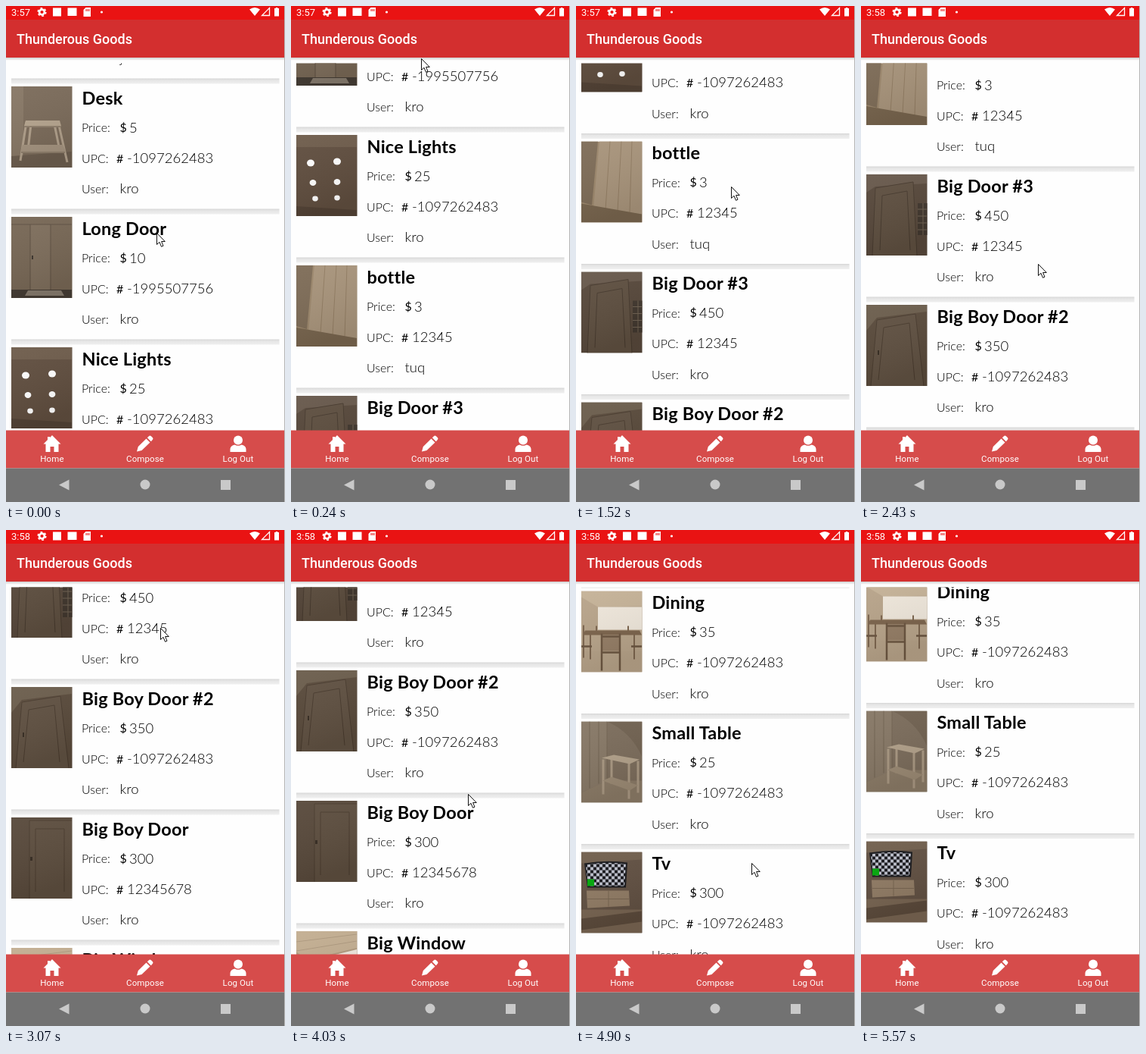
Recreate the animation shown at these times as an HTML page. Size 369 by 654 pixels, loop 5990 ms.

```html
<!DOCTYPE html>
<html lang="en">
<head>
<meta charset="utf-8">
<title>Item list</title>
<style>
html, body { margin: 0; width: 100%; height: 100%; overflow: hidden; background: #fff; }
svg { display: block; width: 369px; height: 654px; }
text { font-family: Lato, sans-serif; white-space: pre; }
.name { font-size: 23.5px; font-weight: 700; letter-spacing: .2px; }
.label, .sign { font-size: 16px; font-weight: 300; }
.sign { font-weight: 400; }
.value { font-size: 18.5px; font-weight: 300; }
.bar text { font-family: Roboto, sans-serif; fill: #fff; }
.clock { font-size: 13px; }
.title { font-size: 18px; font-weight: 500; }
.tab { font-size: 11.5px; text-anchor: middle; letter-spacing: .1px; }
</style>
</head>
<body>
<svg viewBox="0 0 369 654">
  <defs>
    <linearGradient id="gap" x2="0" y2="1"><stop stop-color="#d6d6d6"/><stop offset=".35" stop-color="#e6e6e6"/><stop offset="1" stop-color="#efefef"/></linearGradient>
    <linearGradient id="drop" x2="0" y2="1"><stop stop-color="#cfcfcf"/><stop offset="1" stop-color="#fff"/></linearGradient>
    <linearGradient id="shade" x2=".3" y2="1"><stop stop-color="#fff" stop-opacity=".05"/><stop offset="1" stop-color="#000" stop-opacity=".08"/></linearGradient>
    <pattern id="check" width="8" height="8" patternUnits="userSpaceOnUse"><path fill="#15151a" d="M0 0H8V8H0Z"/><path fill="#b9bcc8" d="M0 0H4V4H0ZM4 4H8V8H4Z"/></pattern>
    <clipPath id="view"><path d="M0 75.5H369V560H0Z"/></clipPath>
    <clipPath id="frame"><path d="M0 0H80.5V107H0Z"/></clipPath>
  </defs>
  <rect width="369" height="654" fill="#fefefe"/>
  <g clip-path="url(#view)"><g id="list"></g></g>
  <rect y="68" width="368" height="4" fill="url(#drop)"/>

  <g class="bar">
    <rect width="368" height="18.5" fill="#e91313"/>
    <rect y="18" width="368" height="50" fill="#d32f2f"/>
    <text class="clock" x="7" y="13" id="clock">3:57</text>
    <circle cx="47.500" cy="8" r="3.400" fill="none" stroke="#fff" stroke-width="2.600"/>
    <circle cx="47.500" cy="8" r="5.300" fill="none" stroke="#fff" stroke-width="1.600" stroke-dasharray="2.780"/>
    <path fill="#fff" d="M62 2.500H73V13.500H62ZM81.500 2.500H93.500V13H81.500ZM105.500 2H112V14H102.500V5Z"/>
    <path stroke="#e91313" d="M106 4V7M108 4V7M110 4V7"/>
    <circle cx="126.500" cy="8" r="1.600" fill="#fff"/>
    <path fill="#fff" d="M322 4.500Q329 -.5 336 4.500L329 13ZM355 3H356.800V2H359.200V3H361V13.500H355Z"/>
    <path fill="none" stroke="#fff" stroke-width="1.300" d="M338.500 12.500H348.500V2.500Z"/>
    <text class="title" x="14" y="50">Thunderous Goods</text>

    <rect y="559.500" width="368" height="50" fill="#d64c4b"/>
    <g fill="#fff">
      <path d="M61 566L72.500 577.500H69.500V588H63.500V581H58.500V588H52.500V577.500H49.500L55 572V568H58V569Z"/>
      <path d="M173 587.500L174.800 581L185.500 570.500L190.500 575.500L179.500 586ZM186.800 569.200L189.200 567Q190.500 566 192 567.300L194 569.200Q195 570.500 194 571.800L191.800 574.200Z"/>
      <circle cx="307" cy="572.500" r="6"/>
      <path d="M296.500 588V584Q297 579.500 302.500 578.500Q307 581 311.500 578.500Q317 579.500 317.500 584V588Z"/>
    </g>
    <text class="tab" x="61" y="601">Home</text>
    <text class="tab" x="184" y="601">Compose</text>
    <text class="tab" x="307" y="601">Log Out</text>

    <rect y="609.500" width="368" height="44.500" fill="#727272"/>
    <path fill="#c9c9c9" d="M70 631.500L83.500 624.500V638.500ZM284 625H297V638H284Z"/>
    <circle cx="184" cy="631" r="6.500" fill="#c9c9c9"/>
  </g>
  <path stroke="#b5b5b5" d="M368.500 0V654"/>
  <path id="cursor" fill="#fff" stroke="#111" stroke-linejoin="round" d="M.5 .5V15.500L4 12.300L6.500 18.300L9 17.200L6.600 11.500H11.300Z"/>
</svg>
<script>
const PITCH = 172, FIRST = 106, LOOP = 5990, STEP = 120;
const $ = id => document.getElementById(id);

const fill = (c, d) => `<path fill="${c}" d="${d}"/>`;
const line = (c, w, d) => `<path fill="none" stroke="${c}" stroke-width="${w}" d="${d}"/>`;
const wall = c => fill(c, 'M0 0H81V107H0Z');

const photos = {
  desk: wall('#7a6a59') + fill('#867664', 'M0 0H16V107H0Z') + fill('#6c5d4e', 'M0 92L80 86V107H0Z') +
    line('#b09f8a', 3, 'M20 47L12 98M62 47L74 100M26 50L22 84M57 50L64 84') +
    fill('#b5a48e', 'M19 45H64L66 52H17Z') + fill('#a4937f', 'M15 77H68L72 86H12Z') +
    line('#8e7e6b', 2, 'M17 53H66M13 87H71'),
  hall: wall('#766654') + fill('#7d6d5b', 'M25 10H52V96H25Z') + line('#5c4e40', 1, 'M25 10V96M52 10V96M0 10H80') +
    fill('#443c34', 'M0 96H80V107H0Z') + fill('#857a6d', 'M22 97H66L70 104H18Z') + fill('#3b342d', 'M27 51H29V56H27Z'),
  lights: wall('#5f4d3e') + fill('#6d5b4a', 'M0 0H80V16H0Z') + fill('#524235', 'M0 94L80 99V107H0Z') +
    [[19, 37], [54, 35], [22, 63], [54, 62], [25, 84], [54, 83]]
      .map(([x, y], i) => `<ellipse cx="${x}" cy="${y}" rx="${5 - (i >> 1) * .6}" ry="${4.6 - (i >> 1) * .6}" fill="#fff"/>`).join(''),
  bottle: wall('#9b866b') + fill('#7d6b56', 'M0 0H22L14 84L0 80Z') + fill('#a7937a', 'M24 0H80V96L16 88Z') +
    line('#917c62', 1, 'M38 0L32 90M53 0L48 92M67 0L64 94') + fill('#77644d', 'M0 82L80 96V107H0Z'),
  bricks: wall('#56473a') + fill('#66574a', 'M0 0H80V12L12 16L0 24Z') + fill('#5d4e3f', 'M12 18L62 10L67 107H8Z') +
    line('#46392d', 1, 'M8 107L12 18L62 10L67 107M18 100L21 28L54 22L58 100') +
    fill('#40362d', 'M68 38H81V80H68Z') + line('#6e6051', 1, 'M68 46H80M68 55H80M68 64H80M68 73H80M75 38V80'),
  slant: wall('#58493a') + fill('#6a5c4b', 'M0 0H80V9L14 17L0 34Z') + fill('#5f5041', 'M14 20L65 12L76 107H6Z') +
    line('#483a2d', 1, 'M6 107L14 20L65 12L76 107M16 99L23 30L57 24L64 99') + fill('#352b21', 'M15 60H17V66H15Z'),
  door: wall('#57483a') + fill('#5c4d3e', 'M24 4H80V107H24Z') +
    line('#483a2d', 1, 'M24 107V4H80M32 98V15H70V98') + fill('#352b21', 'M25 52H28V57H25Z'),
  window: wall('#ae987c') + fill('#c2ad90', 'M0 0H80V22L14 38L0 27Z') + line('#ad987d', 1, 'M0 14L80 4M0 26L80 13') +
    fill('#eee7dc', 'M15 40L80 24V87L9 79Z') + fill('#dcd1c0', 'M11 70L80 77V87L9 79Z') +
    line('#7b6a55', 1.5, 'M9 79L80 88') + fill('#a58f74', 'M0 81L80 92V107H0Z'),
  dining: wall('#b7a389') + fill('#c4b196', 'M0 0H80V20L22 21L0 8Z') + fill('#eee6da', 'M22 21H80V51H22Z') +
    fill('#b5a187', 'M0 79H80V107H0Z') + line('#7a634c', 2, 'M12 57V90M70 57V90M3 45V88M20 46V56M62 46V56') +
    fill('#7b634b', 'M5 52H77L80 58H2Z') + fill('#947d65', 'M27 58H51V79H27Z') +
    line('#6a543f', 2.5, 'M27 56V105M51 56V105M26 60H52M26 81H52M0 73H14M66 73H80'),
  table: wall('#7a6b5a') + fill('#857664', 'M0 0H34V78L0 94Z') + line('#6f604f', 1, 'M11 0V88M23 0V82M34 0V78') +
    fill('#6f604f', 'M34 0Q66 14 80 46V0Z') + fill('#897965', 'M0 94L34 78H80V107H0Z') +
    line('#a89781', 3, 'M29 50V96M40 46V82M63 54V102M75 52V94') +
    fill('#b1a089', 'M27 48L43 44L77 50L64 56Z') + fill('#9a8973', 'M28 78L40 73L75 84L64 91Z'),
  tv: wall('#604f41') + fill('#6f5d4b', 'M0 0H80V10L0 15Z') + fill('#766350', 'M0 76H80V107H0Z') +
    fill('#5a493a', 'M0 88L80 78V92L0 103Z') + fill('#17171a', 'M4 15Q33 10 61 14L59 47L8 47Z') +
    fill('url(#check)', 'M6 17Q33 12 59 16L57 45L9 45Z') + fill('#00a808', 'M8 36H17V45H8Z') +
    fill('#8f7a63', 'M7 51H63L64 71L8 74Z') + line('#75624e', 1, 'M8 62H63M36 51V72')
};

const LONG = '-1097262483', ANN = 'kro', BOB = 'tuq';
const items = [
  ['Shelf', 15, LONG, 'jux', 'desk'],
  ['Desk', 5, LONG, ANN, 'desk'],
  ['Long Door', 10, '-1995507756', ANN, 'hall'],
  ['Nice Lights', 25, LONG, ANN, 'lights'],
  ['bottle', 3, '12345', BOB, 'bottle'],
  ['Big Door #3', 450, '12345', ANN, 'bricks'],
  ['Big Boy Door #2', 350, LONG, ANN, 'slant'],
  ['Big Boy Door', 300, '12345678', ANN, 'door'],
  ['Big Window', 500, LONG, ANN, 'window'],
  ['Dining', 35, LONG, ANN, 'dining'],
  ['Small Table', 25, LONG, ANN, 'table'],
  ['Tv', 300, LONG, ANN, 'tv']
];

const text = (cls, x, y, s) => `<text class="${cls}" x="${x}" y="${y}">${s}</text>`;

$('list').innerHTML = items.map(([name, price, upc, user, photo], i) =>
  `<g transform="translate(0 ${FIRST + (i - 1) * PITCH})">
    <g transform="translate(7 0)" clip-path="url(#frame)">${photos[photo]}${wall('url(#shade)')}</g>
    ${text('name', 100.5, 23.5, name)}
    ${text('label', 100, 60, 'Price:')}${text('sign', 150.5, 59.5, '$')}${text('value', 163, 60.5, price)}
    ${text('label', 100, 100.5, 'UPC:')}${text('sign', 146, 100.5, '#')}${text('value', 160, 100.5, upc)}
    ${text('label', 100, 141, 'User:')}${text('value', 150.5, 141, user)}
    <rect x="7" y="161.5" width="354.500" height="7" fill="url(#gap)"/>
  </g>`).join('');

const smooth = p => p * p * (3 - 2 * p);
const easeIn = p => p * p;
const easeOut = p => 1 - (1 - p) ** 2;
const fling = p => 1 - (1 - p) ** 4.5;

// each move: start time, steps, easing, end position
const scrolling = [
  [120, 3, easeOut, 315],
  [1400, 4, smooth, 572],
  [2700, 4, smooth, 759],
  [3220, 1, smooth, 760],
  [4030, 4, easeIn, 1097],
  [4540, 8, fling, 1415.5]
];
const pointing = [
  [120, 3, easeOut, 169, 40],
  [640, 4, smooth, 225, 381],
  [1400, 4, smooth, 185, 94],
  [2010, 1, smooth, 192, 141],
  [2160, 2, smooth, 231, 315],
  [2430, 1, smooth, 234, 340],
  [2700, 4, smooth, 204, 129],
  [3370, 3, smooth, 236, 367],
  [4030, 4, easeIn, 204, 59],
  [4540, 4, smooth, 232, 439],
  [5170, 3, smooth, 314, 651],
  [5570, 1, smooth, 380, 670]
];

function follow(moves, t, ...pos) {
  for (const [start, steps, ease, ...end] of moves) {
    if (t < start) break;
    const k = Math.min(steps, Math.floor((t - start) / STEP) + 1);
    const p = ease(k / steps);
    pos = pos.map((from, i) => from + (end[i] - from) * p);
  }
  return pos;
}

function draw() {
  const t = performance.now() % LOOP;
  const [scroll] = follow(scrolling, t, 0);
  const [x, y] = follow(pointing, t, 199, 299);
  $('list').setAttribute('transform', `translate(0 ${-Math.round(scroll * 2) / 2})`);
  $('cursor').setAttribute('transform', `translate(${Math.round(x)} ${Math.round(y)})`);
  $('clock').textContent = t < 2160 ? '3:57' : '3:58';
  requestAnimationFrame(draw);
}
draw();
</script>
</body>
</html>
```
